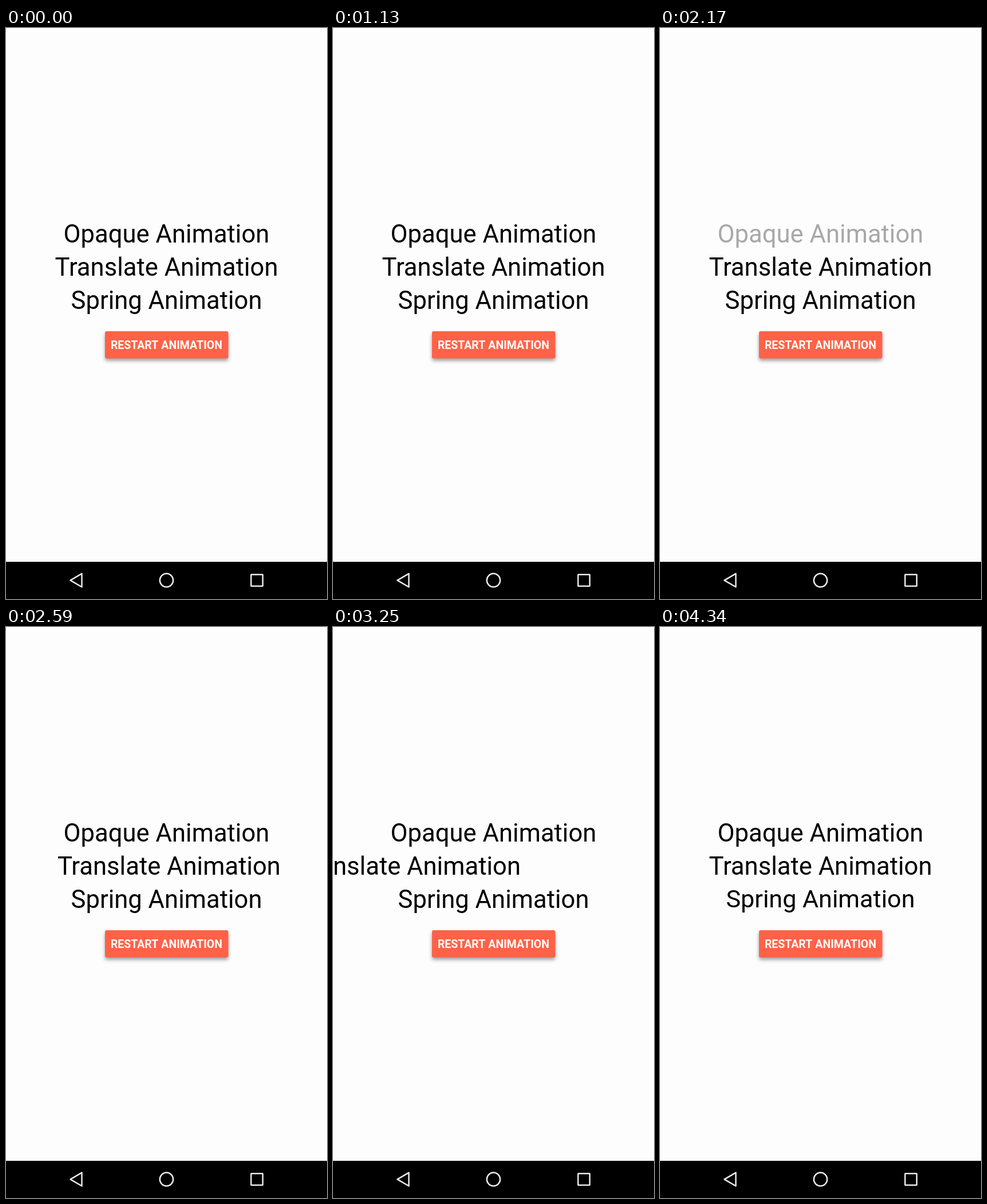
Animation, 561 px wide and 998 px high, one loop 4420 ms. Source, as an HTML page with a canvas:

```html
<!DOCTYPE html>
<html lang="en">
<head>
<meta charset="utf-8">
<title>Animation demo</title>
<style>
  html, body { margin: 0; width: 100%; height: 100%; overflow: hidden; background: #fdfdfd; }
  canvas { display: block; }
</style>
</head>
<body>
<canvas id="stage" width="561" height="998"></canvas>
<script>
const ctx = document.getElementById('stage').getContext('2d');
const W = 561, H = 998, CX = 280.5;
const LOOP = 4420;

const clamp = v => Math.min(1, Math.max(0, v));
const progress = (t, start, length) => clamp((t - start) / length);
const inOut = p => p < 0.5 ? 2 * p * p : 1 - 2 * (1 - p) * (1 - p);

// Full, then invisible, then full again
const fade = t => Math.abs(1 - 2 * progress(t, 1551, 930));

// Swings right, then left, then home
function slide(t) {
  const e = inOut(progress(t, 2540, 1005));
  const reach = 215.5;
  if (e < 0.25) return reach * e * 4;
  if (e < 0.75) return reach * (2 - e * 4);
  return reach * (e * 4 - 4);
}

// Underdamped spring from 0 to 1, folded into a shrink to half and back
function springScale(t) {
  const s = Math.max(0, t - 3545) / 1000;
  const decay = 5.7, freq = 8.2;
  const left = Math.exp(-decay * s) *
    (Math.cos(freq * s) + decay / freq * Math.sin(freq * s));
  const v = 1 - left;
  return v < 0.5 ? 1 - v : v;
}

const press = t => Math.min(progress(t, 1480, 110), 1 - progress(t, 1660, 140));

function label(text, x, y, font, color) {
  ctx.font = font + ' Roboto, sans-serif';
  ctx.fillStyle = color;
  ctx.fillText(text, x, y);
}

const title = (text, x, y) => label(text, x, y, '400 43.6px', '#000');

function roundBox(x, y, w, h, r) {
  ctx.beginPath();
  ctx.roundRect(x, y, w, h, r);
}

function button(t) {
  ctx.save();
  ctx.shadowColor = 'rgba(0, 0, 20, 0.38)';
  ctx.shadowBlur = 6;
  ctx.shadowOffsetY = 4;
  ctx.fillStyle = '#ff6247';
  roundBox(173, 530, 215.5, 47.5, 3);
  ctx.fill();
  ctx.restore();
  ctx.fillStyle = `rgba(0, 0, 0, ${0.075 * press(t)})`;
  ctx.fill();
  label('RESTART ANIMATION', CX, 561.3, '700 19.5px', '#fff');
}

function navBar() {
  ctx.fillStyle = '#000';
  ctx.fillRect(0, 933, W, H - 933);
  ctx.strokeStyle = '#e9e9e9';
  ctx.lineWidth = 2.5;
  ctx.lineJoin = 'round';
  ctx.beginPath();
  ctx.moveTo(112.5, 965.3);
  ctx.lineTo(132.5, 953.6);
  ctx.lineTo(132.5, 977);
  ctx.closePath();
  ctx.stroke();
  ctx.beginPath();
  ctx.arc(280.5, 965.3, 11.7, 0, Math.PI * 2);
  ctx.stroke();
  roundBox(428.3, 955.2, 20.4, 20.4, 0.5);
  ctx.stroke();
}

function draw(t) {
  ctx.fillStyle = '#fdfdfd';
  ctx.fillRect(0, 0, W, H);
  ctx.textAlign = 'center';

  ctx.globalAlpha = fade(t);
  title('Opaque Animation', CX, 374.5);
  ctx.globalAlpha = 1;

  title('Translate Animation', CX + slide(t), 432.5);

  ctx.save();
  ctx.translate(CX, 474.7);
  const scale = springScale(t);
  ctx.scale(scale, scale);
  title('Spring Animation', 0, 15.8);
  ctx.restore();

  button(t);
  navBar();
}

const start = performance.now();
function tick() {
  draw((performance.now() - start) % LOOP);
  requestAnimationFrame(tick);
}
tick();
</script>
</body>
</html>
```
